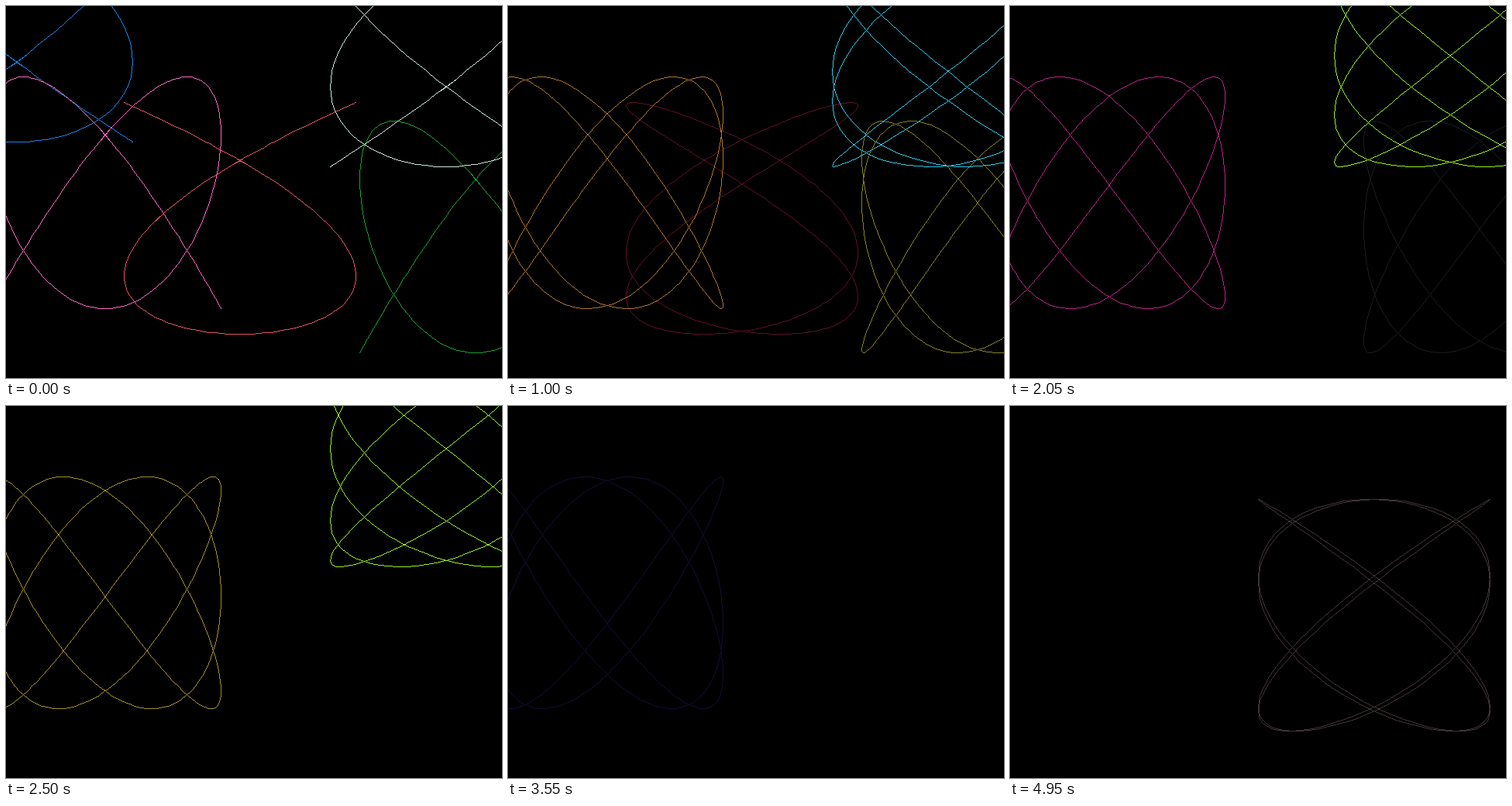
An HTML page with a canvas that plays this animation: 640 by 480 pixels, repeating every 5 s.

```html
<!DOCTYPE html>
<html>
<head>
<meta charset="utf-8">
<style>
html, body { margin: 0; width: 100%; height: 100%; overflow: hidden; background: #000; }
canvas { display: block; }
</style>
</head>
<body>
<canvas id="stage" width="640" height="480"></canvas>
<script>
const ctx = document.getElementById('stage').getContext('2d');
const LOOP = 5000, STEP = 50, RADIUS = 149.4;

// Each curve runs through its palette evenly over its lifetime.
const curves = [
  { cx: 13, cy: 25, a: 5, b: 4, start: 0, end: 600, palette: '#1e82e6 #0a2846' },
  { cx: 301, cy: 273, a: 3, b: 2, start: 0, end: 1050, palette: '#e25460 #5a0f26' },
  { cx: 605, cy: 297, a: 3, b: 4, start: 0, end: 2150, palette: '#18a034 #828028 #141a1a' },
  { cx: 127, cy: 240, a: 3, b: 4, start: 0, end: 3650,
    palette: '#ff69c3 #ab7729 #bd0b99 #9caa14 #0b0935' },
  { cx: 567, cy: 57, a: 5, b: 4, start: 0, end: 2850, palette: '#c8e8d6 #2cc8e8 #98f020 #98f020' },
  { cx: 469, cy: 269, a: 5, b: 4, start: 3850, end: LOOP, palette: '#10debc #10debc #422f30' }
];

const smooth = k => k * k * (3 - 2 * k);
const channels = hex => [1, 3, 5].map(i => parseInt(hex.slice(i, i + 2), 16));

function paletteColor(palette, progress) {
  const colors = palette.split(' ').map(channels);
  const position = progress * (colors.length - 1);
  const index = Math.floor(position);
  const k = smooth(position - index);
  const mixed = colors[index].map((c, i) => Math.round(c + (colors[index + 1][i] - c) * k));
  return `rgb(${mixed})`;
}

// One-pixel line without antialiasing.
function pixelLine(x0, y0, x1, y1) {
  const steps = Math.max(Math.abs(x1 - x0), Math.abs(y1 - y0), 1);
  for (let i = 0; i <= steps; i++) {
    ctx.fillRect(Math.round(x0 + (x1 - x0) * i / steps),
                 Math.round(y0 + (y1 - y0) * i / steps), 1, 1);
  }
}

function drawCurve({ cx, cy, a, b, start, end, palette }, time) {
  const phase = time / STEP / 30 / a;
  let px, py;
  ctx.fillStyle = paletteColor(palette, (time - start) / (end - start));
  for (let deg = 0; deg <= 360; deg++) {
    const angle = deg * Math.PI / 180;
    const x = Math.round(cx + 0.5 + RADIUS * Math.sin(a * angle));
    const y = Math.round(cy + 0.5 + RADIUS * Math.cos(b * angle + phase));
    if (deg) pixelLine(px, py, x, y);
    px = x;
    py = y;
  }
}

let shown = -1;
function render() {
  const time = Math.floor(performance.now() % LOOP / STEP) * STEP;
  if (time !== shown) {
    shown = time;
    ctx.fillStyle = '#000';
    ctx.fillRect(0, 0, 640, 480);
    for (const curve of curves) {
      if (time >= curve.start && time < curve.end) drawCurve(curve, time);
    }
  }
  requestAnimationFrame(render);
}
render();
</script>
</body>
</html>
```
